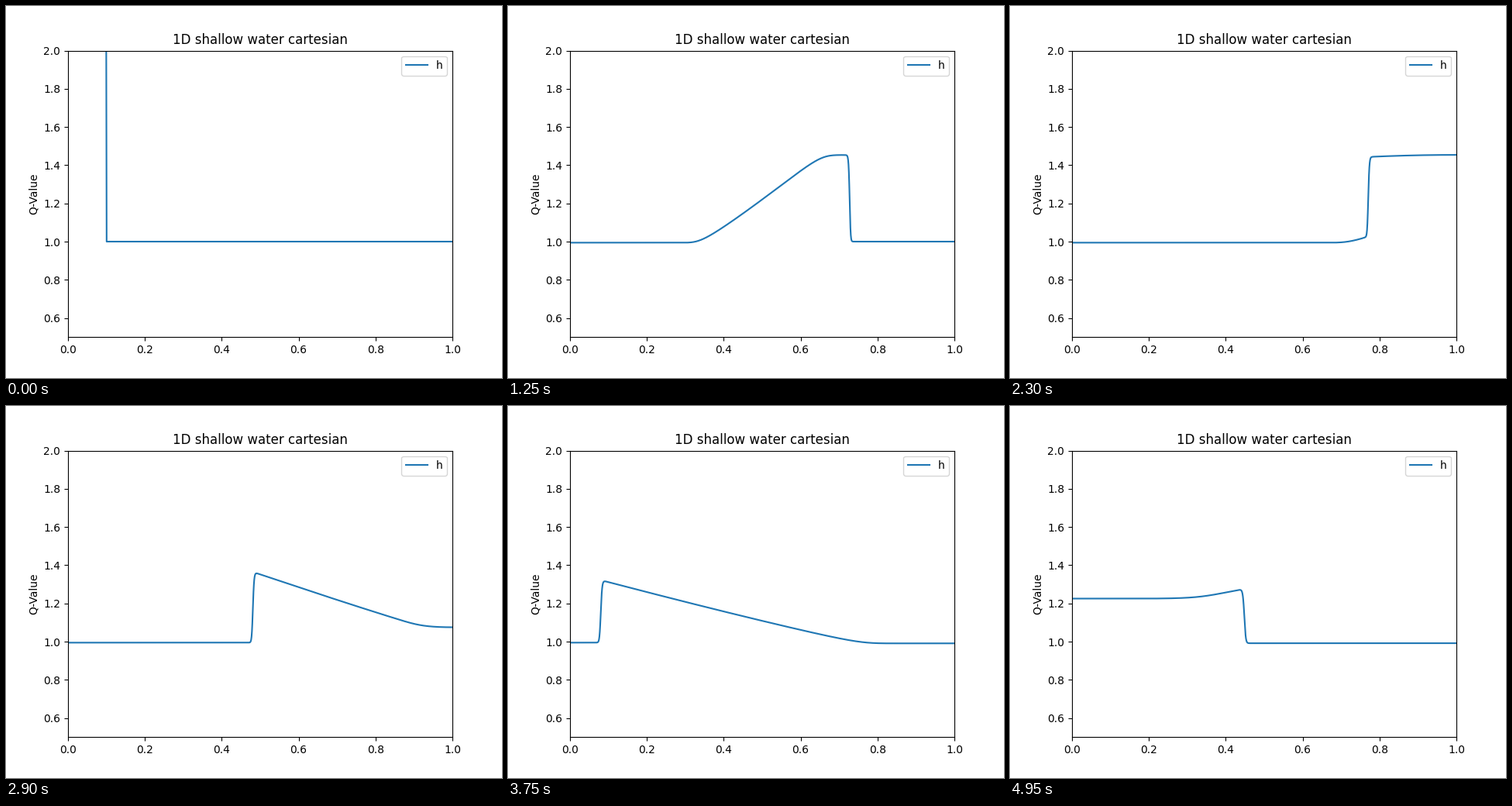
Write a matplotlib script that moves like this. It is 640x480 px and loops after 5000 ms.

```python
import numpy as np
import matplotlib.pyplot as plt
from matplotlib.animation import FuncAnimation

GRAVITY = 9.81
CELLS = 1000
FRAMES = 100
FRAME_TIME = 0.006
STEPS_PER_FRAME = 60

dx = 1.0 / CELLS
dt = FRAME_TIME / STEPS_PER_FRAME
x = (np.arange(CELLS) + 0.5) * dx


def with_walls(q, sign):
    """Add one mirrored ghost cell at each end."""
    return np.concatenate(([sign * q[0]], q, [sign * q[-1]]))


def step(h, hu):
    """Advance depth and momentum by one HLL finite-volume step."""
    hg, mg = with_walls(h, 1), with_walls(hu, -1)
    u = mg / hg
    c = np.sqrt(GRAVITY * hg)
    pressure = mg * u + 0.5 * GRAVITY * hg ** 2

    slow, fast = u - c, u + c
    sl = np.minimum(np.minimum(slow[:-1], slow[1:]), 0)
    sr = np.maximum(np.maximum(fast[:-1], fast[1:]), 0)

    def flux(q, f):
        return (sr * f[:-1] - sl * f[1:] + sl * sr * (q[1:] - q[:-1])) / (sr - sl)

    k = dt / dx
    return h - k * np.diff(flux(hg, mg)), hu - k * np.diff(flux(mg, pressure))


def simulate():
    """Depth profile of a dam break between two walls, one row per frame."""
    h = np.where(x < 0.1, 2.0, 1.0)
    hu = np.zeros(CELLS)
    profiles = [h]
    for _ in range(FRAMES - 1):
        for _ in range(STEPS_PER_FRAME):
            h, hu = step(h, hu)
        profiles.append(h)
    return profiles


depth = simulate()

fig, ax = plt.subplots(figsize=(6.4, 4.8), dpi=100)
line, = ax.plot(x, depth[0], label="h")
ax.set_xlim(0, 1)
ax.set_ylim(0.5, 2)
ax.set_yticks(np.arange(0.6, 2.01, 0.2))
ax.set_ylabel("Q-Value")
ax.set_title("1D shallow water cartesian")
ax.legend(loc="upper right")


def update(frame):
    line.set_ydata(depth[frame])
    return line,


anim = FuncAnimation(fig, update, frames=FRAMES, interval=50,
                     repeat=True, repeat_delay=0)
plt.show()
```
